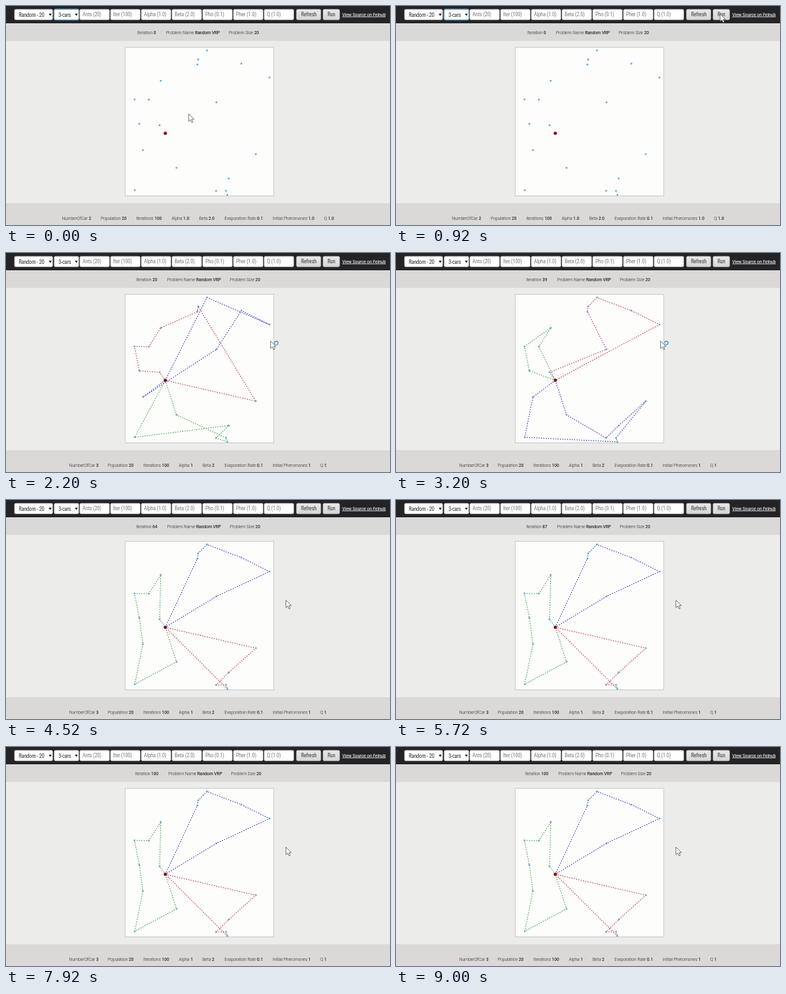
An HTML page that plays this animation: 600x342 px, repeating every 9.12 s.

```html
<!DOCTYPE html>
<html lang="en">
<head>
<meta charset="utf-8">
<title>Vehicle routing</title>
<style>
  html, body { margin: 0; width: 100%; height: 100%; overflow: hidden; background: #ececeb; }
  svg { display: block; width: 600px; height: 342px; }
  text {
    font-family: "Roboto Condensed", Roboto, sans-serif; font-stretch: condensed;
    font-variation-settings: "wdth" 75; letter-spacing: -.025em;
    fill: #2a2a2a; white-space: pre;
  }
  .light { font-weight: 300; }
  .value { font-weight: 400; fill: #111; }
  .hint { fill: #7c7c7c; }
  .action { fill: #3c3c3c; }
  .link { fill: #fff; text-decoration: underline; }
  .route { fill: none; stroke-width: 1.05; stroke-dasharray: 1.6 2.1; }
</style>
</head>
<body>
<svg id="stage" viewBox="0 0 600 342">
  <defs>
    <linearGradient id="button" x2="0" y2="1">
      <stop stop-color="#e9e9e9"/><stop offset="1" stop-color="#d6d6d6"/>
    </linearGradient>
  </defs>
  <rect width="600" height="342" fill="#ececeb"/>
  <rect width="600" height="27" fill="#242427"/>
  <rect y="27" width="600" height="27.5" fill="#dad9d8"/>
  <rect y="308" width="600" height="34" fill="#dad9d8"/>
  <rect x="186.3" y="64.5" width="232" height="232" fill="#fdfdfc" stroke="#c6c6c6"/>
  <g id="toolbar"></g>
  <g id="status"></g>
  <g id="params"></g>
  <g id="routes"></g>
  <g id="nodes"></g>
  <g id="cursor">
    <path d="M.4 .4V12.2L3.2 9.6 5.2 14 7.1 13.2 5.1 8.9H9Z" fill="#fff" stroke="#444" stroke-width=".75"/>
    <g id="busy" transform="translate(9.3 3.6)">
      <circle r="2.7" fill="#eaf6fd" stroke="#4aa3dc" stroke-width="1.7"/>
      <path id="spin" d="M0 -2.7A2.7 2.7 0 0 1 2.7 0" fill="none" stroke="#a5d8f5" stroke-width="1.2"/>
    </g>
  </g>
</svg>
<script>
const LOOP = 9120;
const byId = id => document.getElementById(id);

function add(parent, tag, attrs = {}, content = '') {
  const el = document.createElementNS('http://www.w3.org/2000/svg', tag);
  for (const key in attrs) el.setAttribute(key, attrs[key]);
  el.textContent = content;
  parent.append(el);
  return el;
}

// One common type scale, whether or not the condensed face is available.
const probe = add(byId('params'), 'text', { 'font-size': 7.5, class: 'light' }, 'Evaporation Rate 0.1');
const typeScale = Math.min(1.08, 60 / probe.getComputedTextLength());
probe.remove();

const label = (parent, x, y, size, content, cls = '') =>
  add(parent, 'text', { x, y, 'font-size': size * typeScale, class: cls }, content);

const bar = byId('toolbar');
const box = (x, w, fill = '#fff', stroke = '#c8c8c8') =>
  add(bar, 'rect', { x, y: 5.2, width: w, height: 16.4, rx: 2, fill, stroke, 'stroke-width': .7 });

function select(x, w, textX, content) {
  box(x, w);
  label(bar, textX, 16.5, 8, content);
  add(bar, 'path', { d: `M${x + w - 6} 12h4.4l-2.2 3.4z`, fill: '#111' });
}
select(13.3, 59.6, 20, 'Random - 20');
select(75.3, 38.4, 82, '3-cars');
const focusRing = add(bar, 'rect', {
  x: 75, y: 5, width: 39, height: 16.8, rx: 2, fill: 'none', stroke: '#66a9d9', 'stroke-width': 1
});

['Ants (20)', 'Iter (100)', 'Alpha (1.0)', 'Beta (2.0)', 'Pho (0.1)', 'Pher (1.0)', 'Q (1.0)']
  .forEach((hint, i) => {
    const x = 115.4 + 48 * i;
    box(x, 46.2);
    label(bar, x + 4.2, 16.1, 8, hint, 'hint');
  });
box(453.9, 38, 'url(#button)');
label(bar, 461, 16.2, 8, 'Refresh', 'action');
const runButton = box(495.4, 25.8, 'url(#button)');
label(bar, 502.3, 16.2, 8, 'Run', 'action');
label(bar, 525.3, 15.6, 7.6, 'View Source on Felnub', 'link');

function makeRow(group, y, names) {
  return names.map(name => {
    const text = label(group, 0, y, 7.5, name + ' ', 'light');
    return { text, value: add(text, 'tspan', { class: 'value' }) };
  });
}
function setRow(row, xs, values) {
  row.forEach(({ text, value }, i) => {
    text.setAttribute('x', xs[i]);
    value.textContent = values[i];
  });
}
const status = makeRow(byId('status'), 43.6, ['Iteration', 'Problem Name', 'Problem Size']);
const params = makeRow(byId('params'), 333.8, ['NumberOfCar', 'Population', 'Iterations',
  'Alpha', 'Beta', 'Evaporation Rate', 'Initial Pheromones', 'Q']);

// "*" is the depot; the letters are customers.
const places = {
  A: [314, 69.5], B: [300.3, 83.5], C: [299, 91.5], D: [367.8, 90], E: [411.7, 111.8],
  F: [241.8, 117], G: [200.8, 146], H: [223.2, 146.3], I: [328.8, 150.5], J: [208.3, 184],
  K: [240, 186.3], L: [213.9, 225], M: [390.3, 231.4], N: [266.4, 252.8], O: [348, 269.5],
  P: [201.2, 287.8], Q: [328.3, 288.8], R: [343.8, 288.8], S: [345.8, 295], '*': [248.9, 198.8]
};
for (const key in places) {
  const [cx, cy] = places[key], depot = key === '*';
  add(byId('nodes'), 'circle', { cx, cy, r: depot ? 2.5 : 1.45, fill: depot ? '#800008' : '#62abc9' });
}

// Each plan: first step shown, then the green, blue and red tours.
const plans = [
  [12, 'EDBCAFHG', 'NIMP', 'KJLQORS'],
  [18, 'NRSQOP', 'AEDIL', 'KJGHFCBM'],
  [27, 'JGFH', 'LPSRMOQN', 'KICBADE'],
  [39, 'KFHGJLPN', 'CBADEI', 'MOQRS']
];
const tours = ['#2a942a', '#1c1cb8', '#b81c34'].map(stroke =>
  add(byId('routes'), 'path', { class: 'route', stroke }));
const tourPath = stops => 'M' + [...`*${stops}*`].map(key => places[key]).join('L');

// step, x, y
const cursorKeys = [[1, 285, 168], [8, 506, 12], [11, 506, 12], [14, 479, 38],
  [19, 413, 137], [35, 413, 137], [39, 437, 156]];

function cursorAt(step) {
  const next = cursorKeys.findIndex(key => key[0] > step);
  if (next === 0) return cursorKeys[0].slice(1);
  if (next < 0) return cursorKeys.at(-1).slice(1);
  const [from, x0, y0] = cursorKeys[next - 1], [to, x1, y1] = cursorKeys[next];
  const p = (step - from) / (to - from), e = p * p * (3 - 2 * p);
  return [x0 + (x1 - x0) * e, y0 + (y1 - y0) * e];
}

function render(time) {
  // Ten steps a second, alternating 120 ms and 80 ms.
  const step = time < 200 ? 0 : 2 * Math.floor(time / 200) + (time % 200 >= 120 ? 1 : 0);
  const started = step >= 11;

  const iteration = Math.max(0, Math.min(100, Math.floor(5 + 1.91 * (step - 14))));
  const shift = 1.8 * (String(iteration).length - 1);
  setRow(status, [205 - shift, 250 + shift, 348 + shift], [iteration, 'Random VRP', 20]);
  if (started) setRow(params, [98.7, 159, 214.6, 270, 307, 341.3, 416.6, 491], [3, 20, 100, 1, 2, 0.1, 1, 1]);
  else setRow(params, [87.2, 148, 203.2, 258.7, 301.7, 341.3, 416.6, 497],
    [2, 20, 100, '1.0', '2.0', '0.1', '1.0', '1.0']);

  const plan = plans.findLast(([from]) => step >= from);
  tours.forEach((tour, i) => tour.setAttribute('d', plan ? tourPath(plan[i + 1]) : ''));

  focusRing.setAttribute('visibility', step < 10 ? 'visible' : 'hidden');
  runButton.setAttribute('fill', step === 10 ? '#c9c9c9' : 'url(#button)');
  byId('cursor').setAttribute('transform', `translate(${cursorAt(step)})`);
  byId('busy').setAttribute('visibility', step >= 12 && step < 36 ? 'visible' : 'hidden');
  byId('spin').setAttribute('transform', `rotate(${step * 40})`);
}

const start = performance.now();
function tick() {
  render((performance.now() - start) % LOOP);
  requestAnimationFrame(tick);
}
tick();
</script>
</body>
</html>
```
